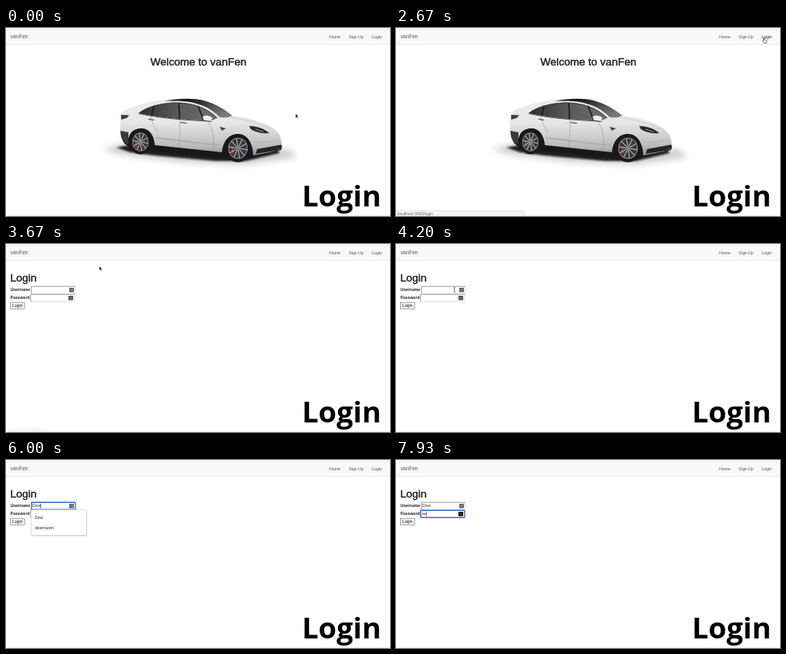
Animation of 480 by 236 pixels, one loop 8 s. Source, as an HTML page:

```html
<!DOCTYPE html>
<html lang="en">
<head>
<meta charset="utf-8">
<title>Login</title>
<style>
  html, body { margin: 0; width: 100%; height: 100%; overflow: hidden; background: #fff; }
  svg { display: block; width: 100vw; height: 100vh; }
  text { font-family: "Liberation Sans", Arial, sans-serif; font-size: 5.1px; fill: #222; }
  .nav { font-size: 5.2px; fill: #555; }
  .brand { font-size: 6.5px; fill: #555; }
  .heading { font-size: 13.5px; fill: #222; stroke: #222; stroke-width: .45; }
  .label { font-weight: bold; }
  .caption { font: bold 36.5px "Open Sans", sans-serif; fill: #000; }
</style>
</head>
<body>
<svg viewBox="0 0 480 236">
  <defs>
    <linearGradient id="paint" x1="0" y1="0" x2="0" y2="1">
      <stop offset="0" stop-color="#ececed"/>
      <stop offset=".42" stop-color="#e6e6e7"/>
      <stop offset=".62" stop-color="#d3d3d5"/>
      <stop offset=".85" stop-color="#b9b9bc"/>
      <stop offset="1" stop-color="#8e8e92"/>
    </linearGradient>
    <linearGradient id="glass" x1="0" y1="0" x2="1" y2="0">
      <stop offset="0" stop-color="#2d2e30"/>
      <stop offset=".5" stop-color="#58595b"/>
      <stop offset="1" stop-color="#6d6e70"/>
    </linearGradient>
    <linearGradient id="shield" x1="0" y1="0" x2="1" y2=".6">
      <stop offset=".3" stop-color="#1b1c1e"/>
      <stop offset="1" stop-color="#77797c"/>
    </linearGradient>
    <filter id="soft" x="-20%" y="-80%" width="140%" height="260%"><feGaussianBlur stdDeviation="4"/></filter>
    <filter id="close" x="-20%" y="-80%" width="140%" height="260%"><feGaussianBlur stdDeviation="1.3"/></filter>
  </defs>

  <rect width="480" height="236" fill="#fff"/>
  <rect y="1" width="480" height="19.5" fill="#f8f8f8"/>
  <path d="M0 1.3H480M0 20.5H480" stroke="#e6e6e6" stroke-width=".8"/>
  <path d="M0 235.3H480" stroke="#ededed" stroke-width=".8"/>
  <text class="brand" x="5.7" y="13.2">vanFen</text>
  <text class="nav" x="404" y="13">Home</text>
  <text class="nav" x="428.3" y="13">Sign Up</text>
  <text class="nav" id="navLogin" x="457.2" y="13">Login</text>

  <g id="home">
    <text class="heading" x="240.5" y="46.7" text-anchor="middle">Welcome to vanFen</text>
    <path d="M120 152L160 143L285 160L352 152L364 162L300 171L220 168L140 158Z" fill="#666" opacity=".35" filter="url(#soft)"/>
    <path d="M138 150L160 146L290 158L340 153L342 157L300 167L262 167L185 160L155 156Z" fill="#111" opacity=".9" filter="url(#close)"/>
    <path d="M143 122L172 124L200 140L262 148L276 130L302 134L316 152L345 148L344 153L312 161L290 167L262 163L188 155L158 153L147 144Z" fill="#18181a"/>
    <path d="M145.5 105C152 101 168 95 184 92C205 88 232 88 247 91C262 95 273 102 283 110
      C302 112 322 118 333 125C340 130 343 135 344 141L345 148C344 152 340 153 334 155
      L309 160C309 144 301 133 290 133C278 133 271 143 270 156L186 147
      C185 134 179 126 169 126C160 126 155 131 153 139L147 136C143 133 142 128 143 122C142 116 142 109 145.5 105Z" fill="url(#paint)"/>
    <path d="M143 129L153 131L153 146L147 143Q143 138 143 129Z" fill="#3a3a3c"/>
    <path d="M198 92C215 88 235 88 247 91C262 95 273 102 283 110C278 112.5 272 113 267 112
      C258 102 247 97 233 93.5C222 91.5 210 91 198 92Z" fill="url(#shield)"/>
    <path d="M166 107C176 99 193 94.5 211 93.8C232 94 250 99 264 113L256 116.5C225 115.5 192 112.5 166 107Z" fill="url(#glass)"/>
    <path d="M166 107C176 99 193 94.5 211 93.8C232 94 250 99 264 113" stroke="#27282a" stroke-width=".8" fill="none"/>
    <path d="M185 98L182 110M216 94L217 114.5M240 98L247 115.5" stroke="#1d1e20" stroke-width="1.7" fill="none"/>
    <path d="M166 107.5C192 113 225 116 257 117" stroke="#38393b" stroke-width=".9" fill="none"/>
    <path d="M245.5 111.5Q251 107.5 258 112.5L256.5 117L247.5 116Z" fill="#ededee"/>
    <path d="M246 116.4L256.5 117.4" stroke="#333" stroke-width=".8"/>
    <path d="M181 111Q183 122 190 132M217 115Q218 136 216 150M253 118Q262 134 259 154" stroke="#99999c" stroke-width=".6" fill="none"/>
    <path d="M187 138C220 141 245 146 268 147" stroke="#adadb0" stroke-width="1.8" fill="none"/>
    <path d="M178 114.5L185 115.5M218 118.5L226 119.5" stroke="#3c3c3f" stroke-width="1.1"/>
    <path d="M144 109L154 109.5L151 113L144 115Z" fill="#49383a"/>
    <path d="M267 124L275 126L270 129Z" fill="#444"/>
    <path d="M281 112.5C300 115 318 120 331 127" stroke="#c4c4c7" stroke-width=".7" fill="none"/>
    <path d="M304 123C314 123.5 323 126 329 132C321 133 312 131 306 127Z" fill="#28292b"/>
    <path d="M312 127L322 130.5" stroke="#b4b8bb" stroke-width=".8"/>
    <path d="M314 152L344 146.5L345 150L337 154L312 158Z" fill="#242426"/>
    <path d="M310 143Q328 144 343 140" stroke="#b0b0b4" stroke-width=".8" fill="none"/>
    <g id="wheels"></g>
  </g>

  <g id="login">
    <text class="heading" x="5.2" y="46.9">Login</text>
    <text class="label" x="5.5" y="59.2">Username</text>
    <text class="label" x="5.5" y="69.2">Password</text>
    <rect x="5.4" y="73.2" width="17.8" height="8.4" fill="#efefef" stroke="#8a8a8a" stroke-width=".7"/>
    <text x="8.1" y="79.2">Login</text>
    <g id="fields"></g>
    <text id="userText" x="33" y="59.4"></text>
    <g id="dots" fill="#222"></g>
    <path id="caret" stroke="#111" stroke-width=".6"/>
    <g id="popup">
      <rect id="popupShade" x="31" y="63" width="70.3" rx="1.5" fill="#000" opacity=".2"/>
      <rect id="popupBox" x="31.3" y="62.6" width="69.4" rx="1.2" fill="#fff" stroke="#c9c9c9" stroke-width=".5"/>
      <text id="option0" x="36" y="73.6"></text>
      <text id="option1" x="36" y="86.6"></text>
      <text id="option2" x="36" y="99.6"></text>
    </g>
  </g>

  <g id="status">
    <rect x="-1" y="229.4" width="161" height="8" rx="1" fill="#f5f5f5" stroke="#d2d2d2" stroke-width=".6"/>
    <text x="1.8" y="235" style="font-size:5px;fill:#666">localhost:3000/login</text>
  </g>

  <text class="caption" x="370" y="223.8">Login</text>

  <g id="pointer">
    <path id="arrow" d="M0 0V5.3L1.2 4.2L2.1 6.2L3 5.8L2.1 3.9H3.8Z" fill="#111" stroke="#fff" stroke-width=".4"/>
    <path id="hand" d="M.5 4V.6Q1 0 1.5 .6V2.8L4.2 3.4Q4.8 3.7 4.6 4.7L4 7H1.2L-.8 4.2Q-.6 3.4 .5 4Z" fill="#fff" stroke="#222" stroke-width=".6"/>
    <path id="beam" d="M-1.2 -2.8Q0 -2.8 0 -2Q0 -2.8 1.2 -2.8M0 -2V2.2M-1.2 3Q0 3 0 2.2Q0 3 1.2 3" fill="none" stroke="#222" stroke-width=".6"/>
  </g>
</svg>
<script>
const LOOP = 8000;
const USER = "Dovi";
const OPTIONS = ["Dovi", "358120@post.test", "dovimaren"];
const USER_KEYS = [5400, 5470, 5730, 5930];
const PASS_KEYS = [6930, 7000, 7070];
const ROUTE = [
  [930, 362, 107.6], [1600, 419.6, 41], [1730, 435.5, 29.5], [2200, 457, 14], [2600, 459, 12],
  [3200, 459, 12], [3670, 116.7, 27.7], [4000, 88, 55], [4270, 68, 58.2]
];

const el = Object.fromEntries([...document.querySelectorAll("svg [id]")].map(n => [n.id, n]));
const show = (node, on) => node.setAttribute("visibility", on ? "inherit" : "hidden");
const between = (t, a, b) => t >= a && t < b;
const ramp = (t, a, b) => Math.min(1, Math.max(0, (t - a) / (b - a)));
const pressed = (keys, t) => keys.filter(k => t >= k).length;

function wheel(cx, cy, rx, ry) {
  let spokes = "";
  for (let i = 0; i < 10; i++) {
    const a = i * Math.PI / 5 + .15;
    spokes += `M${cx} ${cy}L${cx + Math.cos(a) * rx * .72} ${cy + Math.sin(a) * ry * .72}`;
  }
  const disc = (k, fill) => `<ellipse cx="${cx}" cy="${cy}" rx="${rx * k}" ry="${ry * k}" fill="${fill}"/>`;
  return disc(1, "#19191b") + disc(.76, "#8f8f92") + disc(.7, "#39393c") +
    `<path d="M${cx - rx * .5} ${cy - 2}v7l2.5 2v-9z" fill="#b92f35"/>` +
    `<path d="${spokes}" stroke="#b4b4b7" stroke-width="1.1"/>` + disc(.17, "#808084");
}

function field(name, x, y, iconX, iconColor) {
  const icon = [1.5, 3, 4.5].map(d => `<circle cx="${iconX + d}" cy="${y + 4.6}" r=".45" fill="#fff"/>`).join("");
  return `<g id="${name}">
    <rect x="${x}" y="${y}" width="55" height="9" fill="#fff" stroke="#cfcfcf" stroke-width=".7"/>
    <path d="M${x} ${y + 9}V${y}H${x + 55}" fill="none" stroke="#8b8b8b" stroke-width=".7"/>
    <rect class="ring" x="${x}" y="${y}" width="55" height="9" rx=".8" fill="none" stroke="#3973cf" stroke-width="1.4"/>
    <rect class="icon" x="${iconX}" y="${y + 1.8}" width="6" height="5.6" rx=".8" fill="${iconColor}"/>${icon}</g>`;
}

el.wheels.innerHTML = wheel(168, 143, 13.5, 15.5) + wheel(290, 151, 16, 17.5);
el.fields.innerHTML = field("userField", 31.7, 53.2, 79, "#666") + field("passField", 30.8, 63.2, 78, "#555");
el.dots.innerHTML = PASS_KEYS.map((_, i) => `<circle cx="${33.4 + i * 1.75}" cy="67.7" r=".7"/>`).join("");
const userRing = document.querySelector("#userField .ring");
const passRing = document.querySelector("#passField .ring");
const passIcon = document.querySelector("#passField .icon");

function position(t) {
  const next = ROUTE.findIndex(p => p[0] > t);
  if (next === 0) return ROUTE[0].slice(1);
  if (next < 0) return ROUTE[ROUTE.length - 1].slice(1);
  const a = ROUTE[next - 1], b = ROUTE[next], k = ramp(t, a[0], b[0]);
  return [a[1] + (b[1] - a[1]) * k, a[2] + (b[2] - a[2]) * k];
}

function drawPointer(t) {
  const [x, y] = position(t);
  const hand = between(t, 2200, 3230), beam = t >= 4070;
  el.pointer.setAttribute("transform", `translate(${x} ${y})`);
  show(el.pointer, t < 5400);
  show(el.hand, hand);
  show(el.beam, beam);
  show(el.arrow, !hand && !beam);
  el.navLogin.style.fill = hand ? "#222" : "";
}

function drawForm(t) {
  const userFocus = between(t, 4470, 6130), passFocus = t >= 6130;
  const typed = pressed(USER_KEYS, t), secret = pressed(PASS_KEYS, t);
  show(userRing, userFocus);
  show(passRing, passFocus);
  passIcon.setAttribute("fill", passFocus ? "#111" : "#555");
  el.userText.textContent = USER.slice(0, typed);
  [...el.dots.children].forEach((dot, i) => show(dot, i < secret));

  const caretOn = between(t, 4470, 4930) || between(t, 5330, 6130) ||
    between(t, 6200, 6670) || between(t, 6930, 7470) || t >= 7930;
  const x = passFocus ? 32.8 + secret * 1.75 : 33.2 + (typed ? el.userText.getComputedTextLength() : 0);
  el.caret.setAttribute("d", `M${x} ${passFocus ? 64.8 : 54.8}v6`);
  show(el.caret, caretOn);

  const options = typed ? OPTIONS.filter(o => o.toLowerCase().startsWith(USER[0].toLowerCase())) : OPTIONS;
  const height = 6 + options.length * 13;
  el.popupBox.setAttribute("height", height);
  el.popupShade.setAttribute("height", height + .5);
  for (let i = 0; i < 3; i++) el["option" + i].textContent = options[i] || "";
  show(el.popup, between(t, 4530, 6330));
  el.popup.setAttribute("opacity", 1 - ramp(t, 6130, 6330));
}

function draw(t) {
  const onHome = t < 2800;
  show(el.home, onHome);
  show(el.login, !onHome);
  el.status.setAttribute("opacity", ramp(t, 2270, 2470) * (1 - ramp(t, 3200, 3750)));
  drawPointer(t);
  drawForm(t);
}

function tick() {
  draw(performance.now() % LOOP);
  requestAnimationFrame(tick);
}
tick();
</script>
</body>
</html>
```
